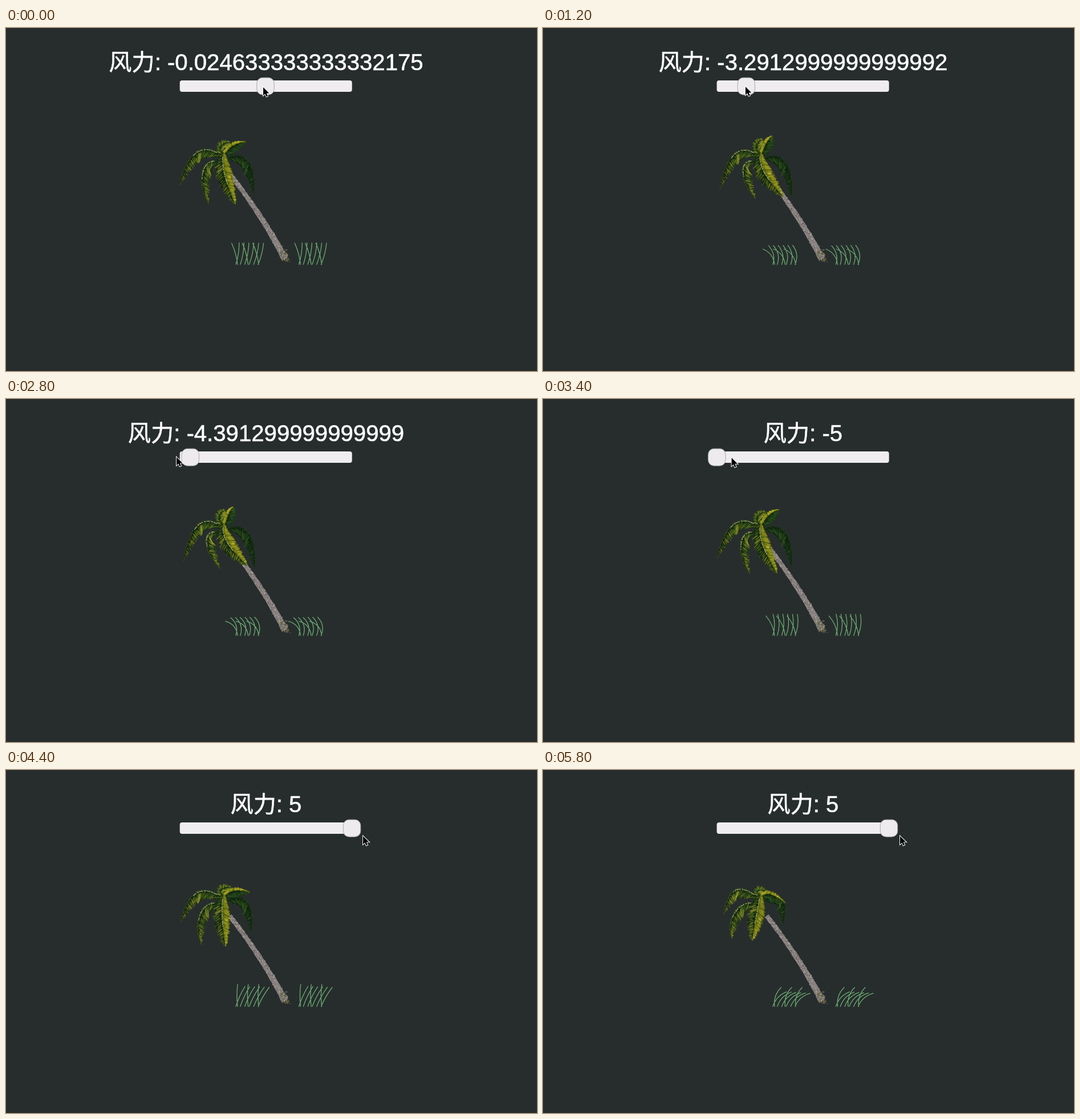
An HTML page for the animation above (6 s loop, 931 by 602 pixels).

```html
<!DOCTYPE html>
<html lang="zh">
<head>
<meta charset="utf-8">
<title>风力</title>
<style>
  html, body { margin: 0; width: 100%; height: 100%; overflow: hidden; background: #272d2d; }
  svg { display: block; width: 931px; height: 602px; }
  text { font: 40.15px "Liberation Sans", Arial, "Noto Sans CJK SC", "Noto Sans CJK", sans-serif; fill: #fff; stroke: #fff; stroke-width: .6px; text-anchor: middle; }
</style>
</head>
<body>
<svg viewBox="0 0 931 602">
  <text id="label" x="456" y="74"></text>
  <rect x="304.7" y="92" width="302" height="20" rx="4" fill="#efedf0"/>
  <rect id="thumb" x="-15.2" y="87.2" width="30.4" height="30" rx="10" fill="#edebee" stroke="#a9a8aa"/>
  <g id="grass" fill="none" stroke="#6bab72" stroke-width="1.3" stroke-linecap="round"></g>
  <g id="tree" fill="none"></g>
  <path id="cursor" d="M0 0V14.5L3.3 11.4L5.6 16.6L8 15.5L5.8 10.4H10.5Z" fill="#000" stroke="#fff" stroke-width="1.9" paint-order="stroke"/>
</svg>
<script>
const LOOP = 6000, STEP = 200, CALM = -0.3;
const $ = id => document.getElementById(id);
const lerp = (a, b, u) => a + (b - a) * u;
const ramp = (t, from, to) => Math.min(1, Math.max(0, (t - from) / (to - from)));
const smooth = u => u * u * (3 - 2 * u);
const pt = (x, y) => x.toFixed(1) + ' ' + y.toFixed(1);

// Seeded generator, so every leaf and streak keeps its look while moving
function seeded(seed) {
  let state = seed * 7919;
  return () => {
    state = state + 0x6D2B79F5 | 0;
    let v = Math.imul(state ^ state >>> 15, 1 | state);
    v = v + Math.imul(v ^ v >>> 7, 61 | v) ^ v;
    return ((v ^ v >>> 14) >>> 0) / 4294967296;
  };
}

function add(parent, attrs) {
  const el = document.createElementNS('http://www.w3.org/2000/svg', 'path');
  for (const name in attrs) el.setAttribute(name, attrs[name]);
  return parent.appendChild(el);
}

// Slider drag: time, wind, pointer x, pointer y
const drag = [
  [200, -0.024633333333332175, 451, 104],
  [800, -3.2912999999999992, 355, 103],
  [2200, -3.2912999999999992, 355, 103],
  [2800, -4.391299999999999, 299, 102],
  [3000, -5, 292, 102],
  [3600, -5, 350, 104],
  [4000, 1.2087000000000003, 523, 109],
  [4400, 5, 626, 116]
];

function dragAt(t) {
  const next = drag.findIndex(key => key[0] > t);
  if (next < 1) return drag[next ? drag.length - 1 : 0];
  const a = drag[next - 1], b = drag[next], u = ramp(t, a[0], b[0]);
  return a.map((v, k) => lerp(v, b[k], u));
}

// The plants lag behind the slider: pushed left, swept back, pushed right
function swayAt(t) {
  return CALM - .75 * smooth(ramp(t, 0, 1200)) - .12 * ramp(t, 1200, 2000)
    + 1.17 * smooth(ramp(t, 2800, 4000)) + .9 * (1 - (1 - ramp(t, 4000, 5800)) ** 1.3);
}

const greens = ['#14280f', '#2f4c1a', '#587026', '#a39a28'];
const deep = ['#10240f', '#1a3817', '#264a1d', '#3c5c22'];
const gold = ['#57620f', '#858c1a', '#a8a522', '#cdc23a'];
const RIM = '#c3cfac';

// curve: calm spine; sides: leaf widths; tones: colours of both sides;
// turn: degrees per unit of sway; stretch: growth per unit of sway; tint: brighter tip
const fronds = [
  { curve: [381, 224, 370, 212, 378, 201, 394, 201], sides: [10, 8], tones: [greens, greens], turn: 25, stretch: -.19, tint: .1 },
  { curve: [388, 229, 410, 217, 440, 228, 434, 294], sides: [18, 2], tones: [deep, deep], turn: -1, stretch: -.15, tint: .25 },
  { curve: [378, 224, 352, 206, 324, 204, 303, 277], sides: [2, 18], tones: [greens, greens], turn: 7.7, stretch: -.08, tint: .5, rim: true },
  { curve: [373, 235, 348, 226, 332, 262, 355, 309], sides: [2, 17], tones: [greens, greens], turn: 17.5, stretch: .11, tint: .5, rim: true },
  { curve: [381, 226, 388, 212, 400, 201, 421, 200], sides: [13, 6], tones: [deep, gold], turn: 36, stretch: .08, tint: .2 },
  { curve: [381, 217, 376, 246, 387, 274, 402, 310], sides: [15, 14], tones: [greens, gold], turn: 19, stretch: .02, tint: .25, rim: true }
];

function cubic(p, u) {
  const v = 1 - u;
  const at = k => v * v * v * p[k] + 3 * v * v * u * p[k + 2] + 3 * v * u * u * p[k + 4] + u * u * u * p[k + 6];
  const slope = k => v * v * (p[k + 2] - p[k]) + 2 * v * u * (p[k + 4] - p[k + 2]) + u * u * (p[k + 6] - p[k + 4]);
  const dx = slope(0), dy = slope(1), len = Math.hypot(dx, dy) || 1;
  return { x: at(0), y: at(1), tx: dx / len, ty: dy / len };
}

// Point beside a spine, swept toward the tip
const beside = (p, width, sweep) =>
  [p.x - width * p.ty + Math.abs(width) * p.tx * sweep, p.y + width * p.tx + Math.abs(width) * p.ty * sweep];

const spread = u => Math.pow(Math.sin(Math.PI * Math.pow(u, .75)), .7) || 0;

// Swings the tip round the base; the outer handle follows in part
function swing({ curve, turn, stretch }, sway) {
  const s = sway - CALM, a = turn * s * Math.PI / 180, grow = 1 + stretch * s - .1 * s * s;
  const [bx, by, , , hx, hy, x, y] = curve, dx = x - bx, dy = y - by;
  const tx = bx + grow * (dx * Math.cos(a) - dy * Math.sin(a));
  const ty = by + grow * (dx * Math.sin(a) + dy * Math.cos(a));
  return [...curve.slice(0, 4), hx + .45 * (tx - x), hy + .45 * (ty - y), tx, ty];
}

function buildFrond(frond) {
  frond.parts = frond.tones.map((tones, s) => ({
    width: frond.sides[s] * (s ? -1 : 1),
    body: add($('tree'), { fill: tones[0] }),
    strands: tones.map(stroke => add($('tree'), { stroke, 'stroke-width': .8 }))
  }));
  if (frond.rim) frond.rimPath = add($('tree'), { stroke: RIM, 'stroke-width': 1.1, 'stroke-dasharray': '7 1 3 2', opacity: .8 });
}

function drawFrond(frond, seed, sway) {
  const curve = swing(frond, sway), random = seeded(seed + 1);
  for (const { width, body, strands } of frond.parts) {
    let edge = '', back = '';
    for (let n = 0; n <= 24; n++) {
      const u = n / 24, p = cubic(curve, u);
      edge += (n ? 'L' : 'M') + pt(...beside(p, width * spread(u) * .88, .3));
      back = 'L' + pt(p.x, p.y) + back;
    }
    body.setAttribute('d', edge + back + 'Z');
    const d = strands.map(() => '');
    for (let n = 0; n < 110; n++) {
      const u = (n + random()) / 110, p = cubic(curve, u);
      const reach = width * spread(u) * (.6 + .5 * random());
      const tone = Math.min(3, Math.floor(4 * (random() * .8 + frond.tint * u ** 3)));
      d[tone] += 'M' + pt(...beside(p, reach * .6 * random(), .4)) + 'L' + pt(...beside(p, reach, .5));
    }
    strands.forEach((el, k) => el.setAttribute('d', d[k]));
  }
  if (frond.rimPath) {
    let d = '';
    for (let u = .1; u < .7; u += .05) {
      const p = cubic(curve, u);
      d += (d ? 'L' : 'M') + pt(p.x, p.y);
    }
    frond.rimPath.setAttribute('d', d);
  }
}

function buildTrunk() {
  const g = $('tree'), random = seeded(40), curve = [392, 256, 424, 296, 462, 352, 489, 405];
  const half = u => 3.9 + 2.3 * u * u;
  let near = '', far = '';
  for (let n = 0; n <= 40; n++) {
    const u = n / 40, p = cubic(curve, u), w = half(u) + random() - .5;
    near += (n ? 'L' : 'M') + pt(...beside(p, w, 0));
    far = 'L' + pt(...beside(p, -w, 0)) + far;
  }
  add(g, { d: near + far + 'Z', fill: '#857e7c' });
  const specks = (colors, count, place) => colors.forEach(stroke => {
    let d = '';
    for (let n = 0; n < count; n++) d += 'M' + pt(...place()) + 'l' + pt(3 * random() - 1, 2 * random() - 1);
    add(g, { d, stroke, 'stroke-width': 1.2 });
  });
  specks(['#454041', '#aaa29f', '#c6bdb6', '#615a5b', '#9c917c'], 75, () => {
    const u = random();
    return beside(cubic(curve, u), (random() * 2 - 1) * half(u), 0);
  });
  // Roots and moss
  specks(['#857b75', '#2d3b25', '#a4874f', '#5b7d43', '#c2ad78', '#4c4543'], 18, () => {
    const v = random();
    return [477 + 7 * v + 14 * random(), 387 + 23 * v];
  });
}

// Each clump mixes upright blades with a denser row leaning right
const blades = [];
for (let n = 0; n < 3; n++) blades.push([406 + 18.5 * n, -.12]);
for (let n = 0; n < 6; n++) blades.push([403 + 7.8 * n, .3 + .02 * n]);
const clumps = [0, 110.5].map(x => add($('grass'), { transform: `translate(${x})` }));

function drawGrass(bend) {
  const h = 19.5;
  const d = blades.map(([x, lean]) => {
    const cx = x + h * Math.sin(lean), cy = 415 - h * Math.cos(lean);
    return 'M' + pt(x, 415) + 'Q' + pt(cx, cy) + ' ' + pt(cx + h * Math.sin(lean + bend), cy - h * Math.cos(lean + bend));
  }).join('');
  clumps.forEach(el => el.setAttribute('d', d));
}

function draw(t) {
  const [, wind, x, y] = dragAt(t), sway = swayAt(t);
  $('label').textContent = '风力: ' + wind;
  $('thumb').setAttribute('transform', `translate(${455.7 + 30.17 * wind})`);
  $('cursor').setAttribute('transform', `translate(${x} ${y})`);
  drawGrass(sway);
  fronds.forEach((frond, n) => drawFrond(frond, n, sway));
}

fronds.slice(0, 2).forEach(buildFrond);
buildTrunk();
fronds.slice(2).forEach(buildFrond);

let shown = -1;
const began = performance.now();
function tick() {
  const t = Math.floor((performance.now() - began) % LOOP / STEP) * STEP;
  if (t !== shown) draw(shown = t);
  requestAnimationFrame(tick);
}
tick();
</script>
</body>
</html>
```
